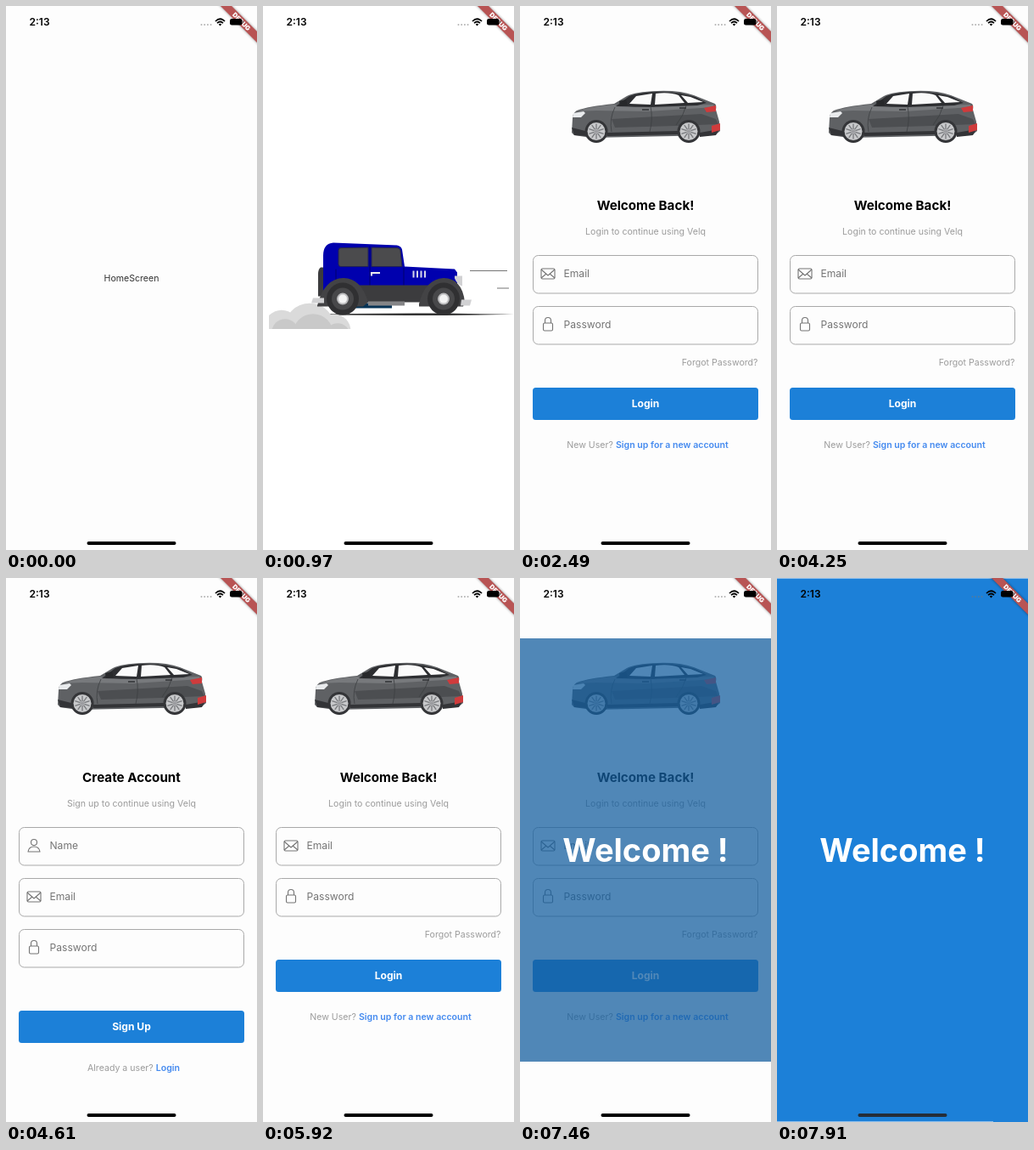
Write an HTML page that moves like this. It is 296 by 640 pixels and loops after 8000 ms.

```html
<!DOCTYPE html>
<html lang="en">
<head>
<meta charset="utf-8">
<title>Cab app</title>
<style>
  html, body { margin: 0; width: 100%; height: 100%; overflow: hidden; background: #fdfdfd; }
  svg { display: block; width: 296px; height: 640px; font-family: Inter, Roboto, sans-serif; }
  .small { font-size: 10.6px; fill: #9b9b9b; }
  .label { font-size: 12.1px; fill: #757575; }
  .bold { font-weight: 700; }
  .mid { text-anchor: middle; }
  .outline { fill: none; stroke: #a9a9a9; }
  .icon { fill: none; stroke: #747474; stroke-width: 1.1; stroke-linejoin: round; }
</style>
</head>
<body>
<svg viewBox="0 0 296 640">
  <defs>
    <clipPath id="dustClip"><rect x="7" y="240" width="289" height="140"/></clipPath>
    <clipPath id="panelClip"><rect id="panelClipRect" width="296"/></clipPath>
    <filter id="blur" x="-20%" y="-100%" width="140%" height="300%"><feGaussianBlur stdDeviation="1.8"/></filter>

    <g id="sedan">
      <path fill="#5f6164" d="M61 149 62 132Q62 126 67 123 80 118 111 115L126 106Q136 101 162 100 188 99 205 105L230 115Q232 117 231 122L235 136 236 147 230 152 84 155 64 152Z"/>
      <path fill="#77797c" d="M66 124Q84 118 111 116L136 119 228 116 229 119 150 124 90 123Z"/>
      <path fill="#4c4e51" d="M108 133 214 127 231 133 234 139 184 141 112 143Z"/>
      <path fill="#333437" d="M61 143 77 147 79 153 64 152ZM103 149 186 147V151L103 153ZM212 149 235 145 231 152 212 154Z"/>
      <path fill="#2d2e31" d="M113 118 129 106Q142 101 166 101 188 101 207 107L220 114 209 117 153 119Z"/>
      <path fill="#fafafa" d="M129 115 137 106 156 103 154 116ZM159 116 160 103Q176 101 187 105L194 114ZM190 105 201 107 216 113 198 114Z"/>
      <path fill="#27282a" d="M117 112 125 110 127 117 118 118Z"/>
      <path fill="#e9ebed" d="M63 126 75 124 77 126 72 131 62 131Z"/>
      <path fill="#cf3b3c" d="M217 120 231 117 231 124 220 125ZM226 141 236 138 236 146 226 149Z"/>
      <path fill="none" stroke="#3d3f42" stroke-width=".8" d="M112 119Q105 133 108 148M154 118Q157 133 153 148M196 117Q193 129 184 140"/>
      <path stroke="#303234" stroke-width="1.4" d="M144 122H152M188 120H196"/>
      <g id="sedanWheels"></g>
    </g>

    <g id="envelope" class="icon">
      <rect x="25" y="309" width="16" height="12" rx="1.5"/>
      <path d="M25 310 33 317 41 310M25 320 31 315M41 320 35 315"/>
    </g>
    <g id="lock" class="icon">
      <rect x="27.5" y="373" width="11" height="9" rx="1.5"/>
      <path d="M29.5 373V370Q29.5 366.500 33 366.500T36.500 370V373"/>
    </g>
    <g id="person" class="icon">
      <circle cx="33" cy="311" r="3.5"/><path d="M26 322Q27 316 33 316T40 322Z"/>
    </g>
  </defs>

  <rect width="296" height="640" fill="#fdfdfd"/>
  <text id="home" class="mid" x="148" y="324" font-size="10.6" fill="#333">HomeScreen</text>

  <g id="drive">
    <rect width="296" height="640" fill="#fff"/>
    <path fill="#333" d="M30 363 Q130 361 215 361.500L296 362.800 215 364Q130 364 30 363Z"/>
    <g id="dust" clip-path="url(#dustClip)"></g>
    <g id="lines" stroke="#666" stroke-width=".9"></g>
    <g id="cab">
      <path fill="#3b3b3d" d="M72 307H68Q65 309 65 315V341H72Z"/>
      <path fill="#063355" d="M108 349H152V355H108Z"/>
      <path fill="#0000ae" d="M71 340V293Q71 279 83 278L158 281Q163 282 164 286L167 306 226 309 229 313V334H190L120 340Z"/>
      <path fill="#4b4b4d" stroke="#25254f" d="M92 284 124 283.500V306H92Q89 306 89 303V287Q89 284 92 284ZM128 283.500 158 284Q161 284 162 287L164 306H128Z"/>
      <path fill="none" stroke="#00006d" d="M126 282V329M166 307V329M86 309V322"/>
      <path fill="#3c3c3e" d="M110 328H196V348H110Z"/>
      <path fill="#434345" d="M64 352Q72 320 95 319.500 116 320 124 348L118 353H64ZM184 350Q191 321 213 319.500 235 320 238 348L236 353H184Z"/>
      <path fill="#858587" d="M124 347H167V352H124Z"/>
      <path fill="#d1d1d3" d="M59 343H72V349H57ZM234 345H246L244 352H233ZM226 317H235V329Q229 327 226 320Z"/>
      <path stroke="#d6d6ea" stroke-width="2" d="M177.500 311V319M182 311V319M186.500 311V319M191 311V319"/>
      <path stroke="#eee" stroke-width="2" d="M127 313.500H138M128 313V317"/>
      <g id="cabWheels"></g>
    </g>
  </g>

  <g id="login"></g>
  <g id="signup"></g>

  <g id="welcome" clip-path="url(#panelClip)">
    <rect id="panel" width="296" height="640"/>
    <text class="bold mid" x="148" y="334" font-size="38" fill="#fff">Welcome !</text>
  </g>

  <g transform="translate(296 0) rotate(45)">
    <rect x="-45" y="21.200" width="90" height="9.200" fill="#000" opacity=".45" filter="url(#blur)"/>
    <rect x="-45" y="21.200" width="90" height="9.200" fill="#b85454"/>
    <text class="mid" y="28.600" font-size="7.600" font-weight="900" fill="#fff">DEBUG</text>
  </g>
  <text x="27.500" y="23" font-size="12" font-weight="600">2:13</text>
  <path stroke="#777" stroke-width="2" stroke-linecap="round" stroke-dasharray="0 3.700" opacity=".55" d="M230.500 22H242"/>
  <path fill="none" stroke="#000" stroke-width="1.700" d="M247 18Q252.500 12.500 258 18M249 20.200Q252.500 16.800 256 20.200"/>
  <path d="M250.700 21.500Q252.500 20 254.300 21.500L252.500 23.500Z"/>
  <rect x="264" y="15" width="14.500" height="7.500" rx="2.300"/>
  <rect x="279" y="17.300" width="1.300" height="3" rx=".6" fill="#777"/>
  <rect id="homeBar" x="95.500" y="630" width="105" height="4" rx="2"/>
</svg>

<script>
const el = id => document.getElementById(id);
const clamp = x => Math.max(0, Math.min(1, x));
const show = (id, on) => el(id).style.display = on ? '' : 'none';
const move = (id, x, y = 0) => el(id).setAttribute('transform', `translate(${x} ${y})`);
const range = n => [...Array(n).keys()];

// The screen updates in coarse steps rather than continuously.
const held = (t, start, step = 115) => start + Math.floor((t - start) / step) * step;
const easeOut = x => 1 - (1 - clamp(x)) ** 3;

// CSS "ease": cubic-bezier(.25, .1, .25, 1)
function ease(x) {
  let low = 0, high = 1;
  const curve = (a, b, s) => 3 * a * s * (1 - s) ** 2 + 3 * b * s * s * (1 - s) + s ** 3;
  for (let i = 0; i < 20; i++) {
    const s = (low + high) / 2;
    if (curve(.25, .25, s) < clamp(x)) low = s; else high = s;
  }
  return curve(.1, 1, low);
}

const disc = (x, y, r, fill) => `<circle cx="${x}" cy="${y}" r="${r}" fill="${fill}"/>`;

el('sedanWheels').innerHTML = [90, 199].map(x =>
  disc(x, 147.5, 13.5, '#343538') + disc(x, 147.5, 10.5, '#c8c9cb') +
  range(10).map(i => `<path stroke="#77797c" stroke-width="1.3" transform="rotate(${i * 36} ${x} 147.5)" d="M${x} 145V138.500"/>`).join('') +
  disc(x, 147.5, 2.2, '#9b9ca0')).join('');

el('cabWheels').innerHTML = [94, 213].map(x =>
  disc(x, 344, 19, '#303032') + disc(x, 344, 13, '#48484a') + disc(x, 344, 7, '#bcbcbe') + disc(x, 344, 5, '#f4f4f4')).join('');

function field(y, label, icon, iconShift) {
  return `<rect class="outline" x="15.500" y="${y}" width="265" height="44.500" rx="6"/>
    <use href="#${icon}" y="${iconShift}"/>
    <text class="label" x="51.500" y="${y + 25.8}">${label}</text>`;
}

function page({ title, subtitle, fields, help = '', shift, button, question, link }) {
  return `<rect width="296" height="640" fill="#fdfdfd"/><use href="#sedan"/>
    <text class="bold mid" x="148" y="239.500" font-size="15.200">${title}</text>
    <text class="small mid" x="148" y="268.500">${subtitle}</text>
    ${fields}
    <text class="small" x="280.500" y="423" text-anchor="end">${help}</text>
    <g transform="translate(0 ${shift})">
      <rect x="15" y="449" width="266" height="38" rx="3.500" fill="#1c80d8"/>
      <text class="bold mid" x="148" y="472.300" font-size="12.100" fill="#fff">${button}</text>
      <text class="small mid" x="150.500" y="519.500">${question} <tspan font-weight="600" fill="#448aef">${link}</tspan></text>
    </g>`;
}

el('login').innerHTML = page({
  title: 'Welcome Back!', subtitle: 'Login to continue using Velq',
  fields: field(293.5, 'Email', 'envelope', 0) + field(353.5, 'Password', 'lock', 0),
  help: 'Forgot Password?', shift: 0,
  button: 'Login', question: 'New User?', link: 'Sign up for a new account'
});
el('signup').innerHTML = page({
  title: 'Create Account', subtitle: 'Sign up to continue using Velq',
  fields: field(293.5, 'Name', 'person', 0) + field(353.5, 'Email', 'envelope', 60) + field(413.5, 'Password', 'lock', 60),
  shift: 60, button: 'Sign Up', question: 'Already a user?', link: 'Login'
});

// Speed lines: x, y, length
const speedLines = [[30, 301.5, 40], [187, 294.5, 43], [-22, 311.5, 44], [10, 332, 14], [264, 311.5, 36], [247, 338, 15]];
const puffs = [[22, 378, 21], [55, 380, 29], [84, 382, 21]];

function drawDrive(t) {
  const step = Math.floor((Math.min(t, 2080) - 500) / 114) - 11;
  el('lines').innerHTML = speedLines.map(([x, y, length]) => {
    const left = ((x - step * 38 + 50) % 350 + 350) % 350 - 50;
    return `<path d="M${left} ${y}h${length}"/>`;
  }).join('');
  el('dust').innerHTML = ['#dadada', '#c9c9c9'].map((fill, layer) => puffs.map(([x, y, r], i) =>
    disc(x + layer * 4, y + layer * 6, r * (1 - layer * .22) + 2 * Math.sin(step * 1.3 * (i + 1)), fill)).join('')).join('');
  move('cab', 0, .6 * Math.sin(step * Math.PI / 2));
}

function drawWelcome(t) {
  const p = t < 6990 ? 0 : ease((held(t, 6990) - 6985) / 975);
  show('welcome', p > 0);
  el('panelClipRect').setAttribute('y', 320 - 320 * p);
  el('panelClipRect').setAttribute('height', 640 * p);
  // Transparent black blends into blue as the panel opens.
  const mix = p ** 1.2;
  el('panel').setAttribute('fill', `rgba(${[28, 128, 216].map(c => Math.round(c * mix))},${mix})`);
  el('homeBar').setAttribute('fill', p > .97 ? '#252d38' : '#000');
}

function draw(t) {
  show('home', t < 500);
  show('drive', t >= 500 && t < 2490);
  if (t >= 500 && t < 2490) drawDrive(t);

  show('login', t >= 2380);
  el('login').setAttribute('opacity', t < 2490 ? .5 : 1);

  let slide = 0;
  if (t >= 4250 && t < 5690) slide = easeOut((held(t, 4250) - 4250) / 345);
  else if (t >= 5690 && t < 5920) slide = 1 - easeOut((held(t, 5690) - 5575) / 345);
  show('signup', slide > 0);
  move('login', -99 * slide);
  move('signup', 296 * (1 - slide));

  drawWelcome(t);
}

function frame() {
  draw(performance.now() % 8000);
  requestAnimationFrame(frame);
}
frame();
</script>
</body>
</html>
```
